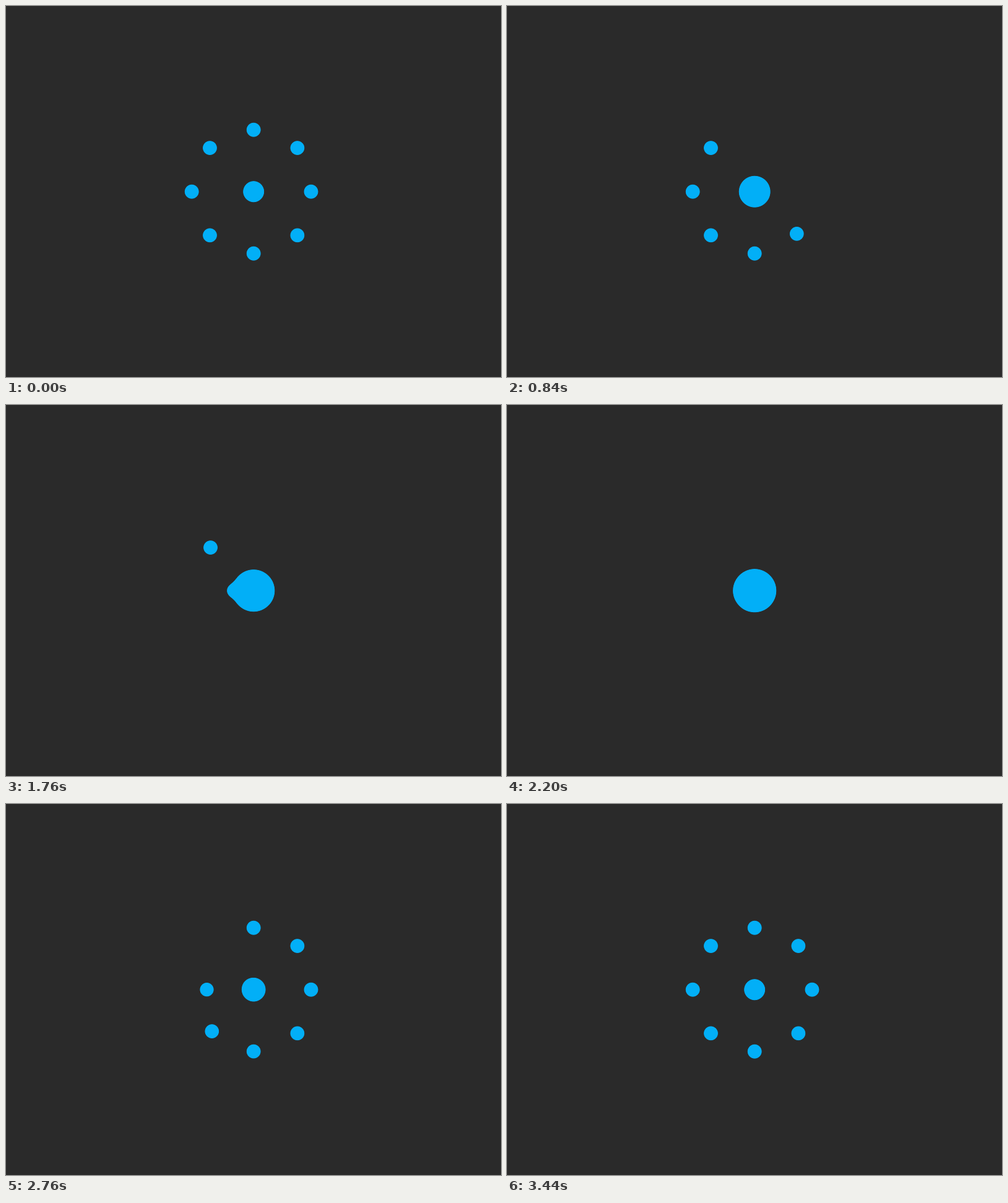
Write an HTML page that moves like this. It is 800 px wide and 600 px high and loops after 3.48 s.

```html
<!DOCTYPE html>
<html lang="en">
<head>
<meta charset="utf-8">
<title>Gooey loader</title>
<style>
  html, body { margin: 0; width: 100%; height: 100%; overflow: hidden; background: #2a2a2a; }
  svg { display: block; }
</style>
</head>
<body>
<svg width="800" height="600" viewBox="0 0 800 600">
  <filter id="goo" filterUnits="userSpaceOnUse" x="0" y="0" width="800" height="600" color-interpolation-filters="sRGB">
    <feGaussianBlur stdDeviation="6"/>
    <feColorMatrix values="0 0 0 0 .008  0 0 0 0 .686  0 0 0 0 .969  0 0 0 18 -7"/>
  </filter>
  <g id="blobs" filter="url(#goo)"></g>
</svg>
<script>
const LOOP = 3480, CX = 400.2, CY = 300.2;
const IN_STAGGER = 240, IN_TIME = 480;
const OUT_START = 2160, OUT_STAGGER = 80, OUT_TIME = 290;
// [time, radius] of the core
const CORE = [[0, 17.3], [560, 21], [840, 25.5], [1240, 28.5], [1680, 33.4],
              [1920, 35.2], [2200, 35], [2840, 17.4], [LOOP, 17.3]];
const group = document.getElementById('blobs');

function addCircle() {
  const circle = document.createElementNS('http://www.w3.org/2000/svg', 'circle');
  return group.appendChild(circle);
}

function place(circle, cx, cy, r) {
  circle.setAttribute('cx', cx);
  circle.setAttribute('cy', cy);
  circle.setAttribute('r', r);
}

// Eased progress along cubic-bezier(x1, 0, x2, 1)
function ease(x, x1, x2) {
  if (x <= 0) return 0;
  if (x >= 1) return 1;
  let lo = 0, hi = 1, u;
  for (let i = 0; i < 24; i++) {
    u = (lo + hi) / 2;
    const v = 1 - u;
    if (3 * u * v * v * x1 + 3 * u * u * v * x2 + u ** 3 < x) lo = u; else hi = u;
  }
  return u * u * (3 - 2 * u);
}

function coreRadius(t) {
  const i = CORE.findIndex(([time]) => time > t);
  const [t0, r0] = CORE[i - 1], [t1, r1] = CORE[i];
  return r0 + (r1 - r0) * (t - t0) / (t1 - t0);
}

const core = addCircle();
const dots = Array.from({ length: 8 }, (_, i) => {
  const angle = (i - 2) * Math.PI / 4;
  const distance = i === 2 ? 92.8 : 100;
  return { circle: addCircle(), dx: distance * Math.cos(angle), dy: distance * Math.sin(angle) };
});

function render(t) {
  place(core, CX, CY, coreRadius(t) - 0.6);
  dots.forEach(({ circle, dx, dy }, i) => {
    const inward = ease((t - i * IN_STAGGER) / IN_TIME, 0.87, 0.45);
    const outward = ease((t - OUT_START - i * OUT_STAGGER) / OUT_TIME, 0.35, 0.07);
    const away = 1 - inward + outward;
    place(circle, CX + dx * away, CY + dy * away, 10.5 + 1.1 * away);
  });
}

function frame() {
  render(performance.now() % LOOP);
  requestAnimationFrame(frame);
}
frame();
</script>
</body>
</html>
```
